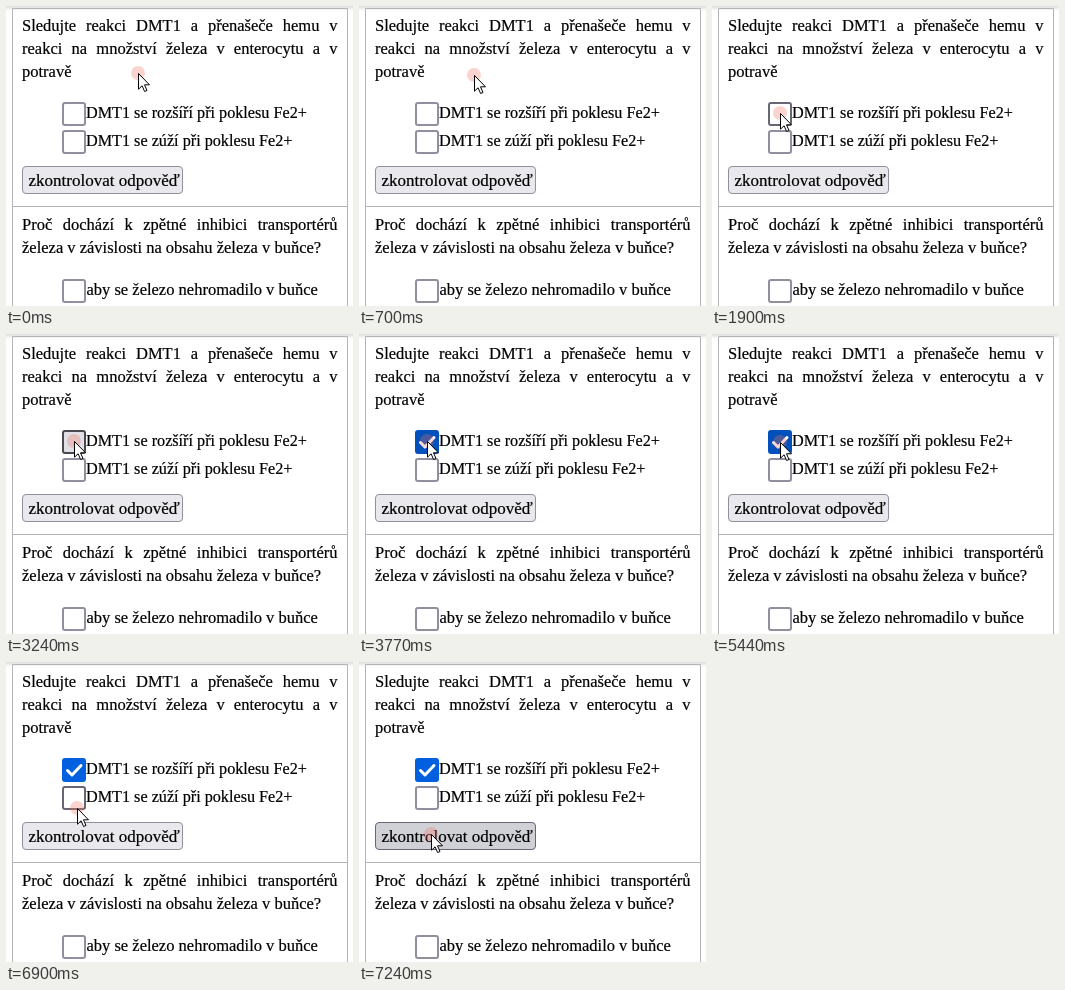
An HTML page for the animation above (8000 ms loop, 347 by 300 pixels).

```html
<!DOCTYPE html>
<html lang="cs">
<head>
<meta charset="utf-8">
<style>
  html, body { margin: 0; width: 100%; height: 100%; overflow: hidden; background: #fff; }
  svg { display: block; width: 347px; height: 300px; background: linear-gradient(#dcdcdc, #fff 5px); }
  text { font: 16.5px "Liberation Serif", serif; fill: #000; stroke: #000; stroke-width: .2; }
  .label { font-size: 16.2px; }
  .button { font-size: 17px; }
  .frame { fill: none; stroke: #b4b4b4; }
  .box { fill: #fff; stroke: #8f8f9d; stroke-width: 2; }
  .box.hover { stroke: #676774; }
  .box.active { fill: #e0e0e6; stroke: #484851; }
  .box.checked { fill: #0060df; stroke: #0060df; }
  .box.checked.hover { fill: #0250bb; stroke: #0250bb; }
  #button { fill: #e9e9ed; stroke: #8f8f9d; }
  #button.hover { fill: #d0d0d7; stroke: #676774; }
</style>
</head>
<body>
<svg viewBox="0 0 347 300">
  <path class="frame" d="M6.5 300V2.5H341.5V300M6.5 200.5H341.5"/>
  <text class="justify" x="16" y="25">Sledujte reakci DMT1 a přenašeče hemu v</text>
  <text class="justify" x="16" y="48">reakci na množství železa v enterocytu a v</text>
  <text x="16" y="71">potravě</text>

  <rect id="first" class="box" x="57" y="97" width="22" height="22" rx="2"/>
  <path id="tick" d="M61.5 108.5l4.5 4.5 9-9.5" fill="none" stroke="#fff" stroke-width="3" stroke-linecap="round" stroke-linejoin="round"/>
  <text class="label" x="80" y="112">DMT1 se rozšíří při poklesu Fe2+</text>
  <rect id="second" class="box" x="57" y="125" width="22" height="22" rx="2"/>
  <text class="label" x="80" y="140">DMT1 se zúží při poklesu Fe2+</text>

  <rect id="button" x="16.5" y="160.5" width="160" height="27" rx="3.5"/>
  <text class="button" x="22.5" y="180">zkontrolovat odpověď</text>

  <text class="justify" x="16" y="224">Proč dochází k zpětné inhibici transportérů</text>
  <text x="16" y="247">železa v závislosti na obsahu železa v buňce?</text>
  <rect class="box" x="57" y="274" width="22" height="22" rx="2"/>
  <text x="80.5" y="289">aby se železo nehromadilo v buňce</text>

  <g id="pointer">
    <circle r="7" fill="#f4705f" opacity=".3"/>
    <path d="M.5 .5V16.2L4.1 12.8 6.6 18.5 9 17.5 6.5 11.8H11.5Z" fill="#fff" stroke="#000"/>
  </g>
</svg>
<script>
const LOOP = 8000, START = 500, STEP = 200 / 3, LINE_WIDTH = 315.5;
const PRESS = 3235, CHECK = 3300;
// [time, x, y] of the pointer tip
const path = [
  [433, 132, 67], [1166, 75, 75], [1300, 75, 78.5], [1900, 68, 107],
  [5366, 68, 107], [5900, 70.5, 134], [6700, 70.5, 134], [7233, 72, 172]
];
const [first, second, button, tick, pointer] =
  ['first', 'second', 'button', 'tick', 'pointer'].map(id => document.getElementById(id));

for (const line of document.querySelectorAll('.justify')) {
  const gaps = line.textContent.split(' ').length - 1;
  line.style.wordSpacing = (LINE_WIDTH - line.getComputedTextLength()) / gaps + 'px';
}

function pointerAt(time) {
  const next = path.findIndex(key => key[0] > time);
  if (next === 0) return path[0].slice(1);
  if (next < 0) return path[path.length - 1].slice(1);
  const [t0, x0, y0] = path[next - 1], [t1, x1, y1] = path[next];
  const p = (time - t0) / (t1 - t0), eased = p * p * (3 - 2 * p);
  return [x0 + (x1 - x0) * eased, y0 + (y1 - y0) * eased];
}

function draw(now) {
  const t = now % LOOP;
  // The pointer is sampled 15 times a second.
  const time = START + Math.floor((t - START) * 3 / 200) * STEP;
  const [x, y] = pointerAt(time);
  const checked = t >= CHECK;
  pointer.setAttribute('transform', `translate(${Math.round(x)} ${Math.round(y)})`);
  first.classList.toggle('hover', y >= 96 && y < 120);
  first.classList.toggle('active', t >= PRESS && !checked);
  first.classList.toggle('checked', checked);
  second.classList.toggle('hover', y >= 124 && y < 148);
  button.classList.toggle('hover', y >= 160);
  tick.style.visibility = checked ? 'visible' : 'hidden';
  requestAnimationFrame(() => draw(performance.now()));
}
draw(performance.now());
</script>
</body>
</html>
```
